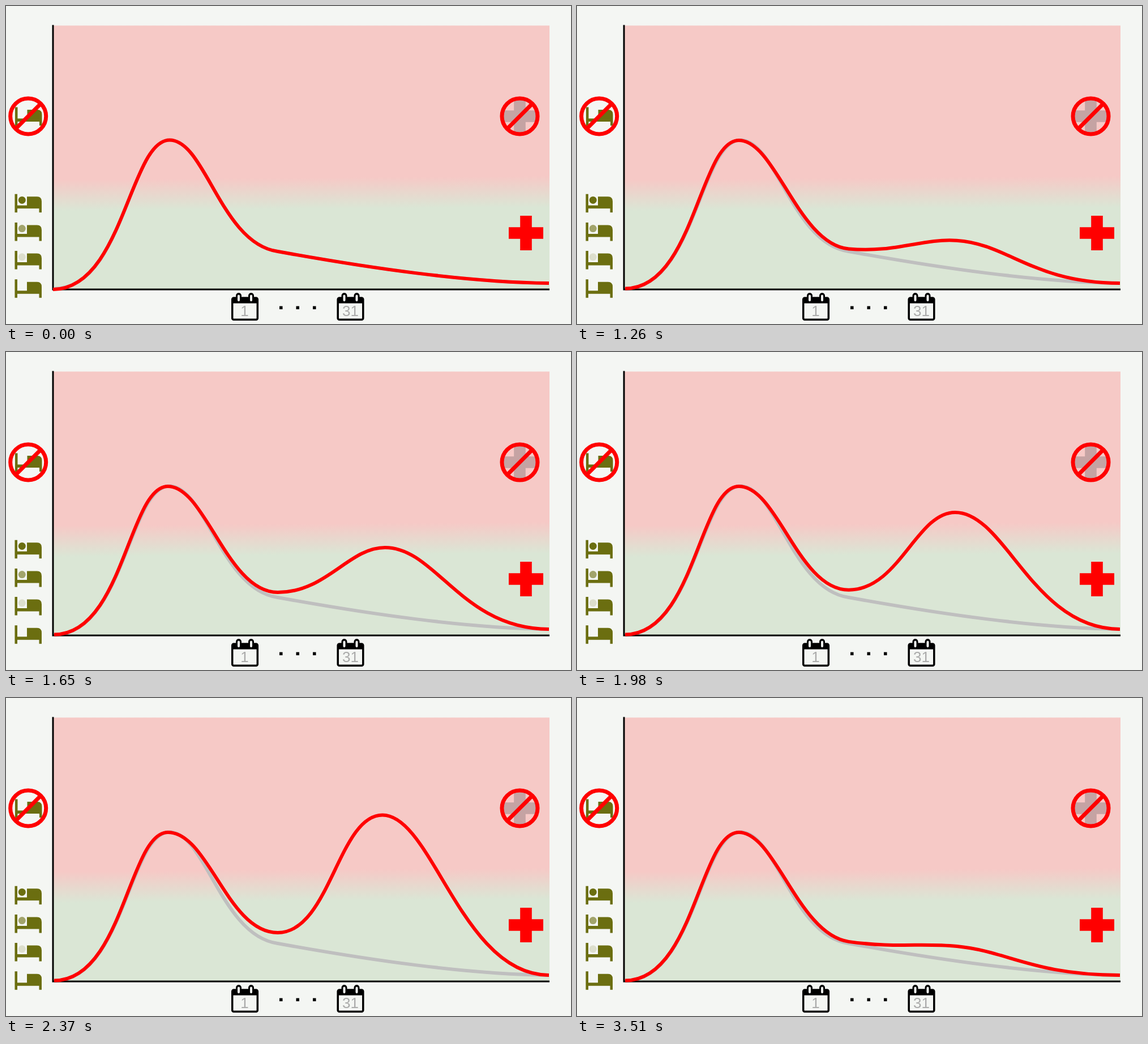
Write an HTML page that moves like this. It is 998 px wide and 561 px high and loops after 3540 ms.

```html
<!DOCTYPE html>
<html lang="en">
<head>
<meta charset="utf-8">
<title>Two waves</title>
<style>
html, body { margin: 0; width: 100%; height: 100%; overflow: hidden; background: #f4f6f3; }
svg { display: block; width: 100%; height: 100%; }
text { font: 26px "Liberation Sans", Arial, sans-serif; fill: #aaa; text-anchor: middle; }
</style>
</head>
<body>
<svg viewBox="0 0 998 561">
  <defs>
    <linearGradient id="zone" gradientUnits="userSpaceOnUse" x1="520" y1="303" x2="520.4" y2="358">
      <stop offset="0" stop-color="#f6c9c6"/>
      <stop offset="1" stop-color="#dae6d5"/>
    </linearGradient>
    <path id="bed" fill="#6b6e10" d="M15.5 0H20V20H37V4.5H55Q63 4.5 63 13V32.5H58.5V25.5H20V32.5H15.5Z"/>
    <path id="cross" d="M-10.3-30.5H10.3V-10.3H30.5V10.3H10.3V30.5H-10.3V10.3H-30.5V-10.3H-10.3Z"/>
    <g id="ban" fill="none" stroke="#f00" stroke-width="7">
      <circle r="31.5"/>
      <path d="M-22 22L22-22"/>
    </g>
    <g id="calendar">
      <rect x="-22.3" y="515" width="44.6" height="38.3" rx="2.5" fill="#f4f6f3" stroke="#000" stroke-width="3.5"/>
      <path d="M-22 515H22V524.5H-22Z"/>
      <g stroke-linecap="round">
        <path d="M-11 511V518M11 511V518" stroke="#000" stroke-width="10"/>
        <path d="M-11 511.5V519M11 511.5V519" stroke="#f4f6f3" stroke-width="4"/>
      </g>
    </g>
  </defs>

  <rect width="998" height="561" fill="#f4f6f3"/>
  <rect x="83" y="34.5" width="877" height="465.5" fill="url(#zone)"/>

  <g id="beds"></g>
  <use href="#bed" x="0.5" y="178.5"/>
  <use href="#ban" x="39.2" y="194.5"/>

  <use href="#cross" x="907.5" y="194.5" fill="#c5a3a3"/>
  <use href="#ban" x="907.5" y="194.5"/>
  <use href="#cross" x="918.5" y="400.5" fill="#f00"/>

  <use href="#calendar" x="422"/>
  <use href="#calendar" x="608.5"/>
  <text x="421.5" y="547">1</text>
  <text x="608.5" y="547">31</text>
  <path d="M483 532.2H548" stroke="#000" stroke-width="5.5" stroke-dasharray="5.5 24"/>

  <path id="first" fill="none" stroke="#bfbfbf" stroke-width="6"/>
  <path d="M83 33.5V500H960" fill="none" stroke="#000" stroke-width="3"/>
  <path id="wave" fill="none" stroke="#f00" stroke-width="6"/>
</svg>
<script>
const LOOP = 3540, STEP = 30, LAST = 48;
const get = id => document.getElementById(id);

const tail = "C207 499 219 236.5 289 236.5C352 236.5 380 419 480 433C640 462 810 487 959 489";
const rest = "M83 500" + tail;
get("first").setAttribute("d", "M86 498.5" + tail);

get("beds").innerHTML = [1, 0.6, 0.17, 0].map((alpha, i) => {
  const y = 331.7 + i * 50.2;
  return `<use href="#bed" y="${y}"/>` +
    `<circle cx="28.3" cy="${y + 10.7}" r="6.5" fill="#6b6e10" opacity="${alpha}"/>`;
}).join("");

// Steps 1 to 48 raise the second wave; the way back is six times as fast.
function stepAt(t) {
  if (t < 960) return 0;
  if (t < 3330) return Math.min(LAST, Math.floor((t - 930) / STEP));
  return LAST - 6 * Math.floor((t - 3300) / STEP);
}

// Point on the tangent of a node, dx to its right
const handle = (node, dx) => `${node.x + dx} ${node.y + node.slope * dx}`;

function curve(k) {
  if (k < 1) return rest;
  const u = k / LAST;
  const tilt = Math.max(0, 1 - 2.4 * u);
  const valley = { x: 480, y: 431 - 17 * u ** 1.3, slope: 0.2 * tilt };
  const peak = { x: 671 - 6 * u ** 2, y: 463 - 256.5 * u ** 1.12, slope: 0.14 * tilt };
  return "M85 498.5C207 498.5 217 237 286 237" +
    `C${350 + 8 * u ** 2} 237 ${handle(valley, -89)} ${handle(valley, 0)}` +
    `C${handle(valley, 80 + 12 * u)} ${handle(peak, -62 - 16 * u ** 3)} ${handle(peak, 0)}` +
    `C${handle(peak, 92 - 4 * u)} 805 488.5 959 489`;
}

const wave = get("wave");
const start = performance.now();
function draw(now) {
  const t = Math.max(0, now - start) % LOOP;
  wave.setAttribute("d", curve(stepAt(t)));
  requestAnimationFrame(draw);
}
draw(start);
</script>
</body>
</html>
```
